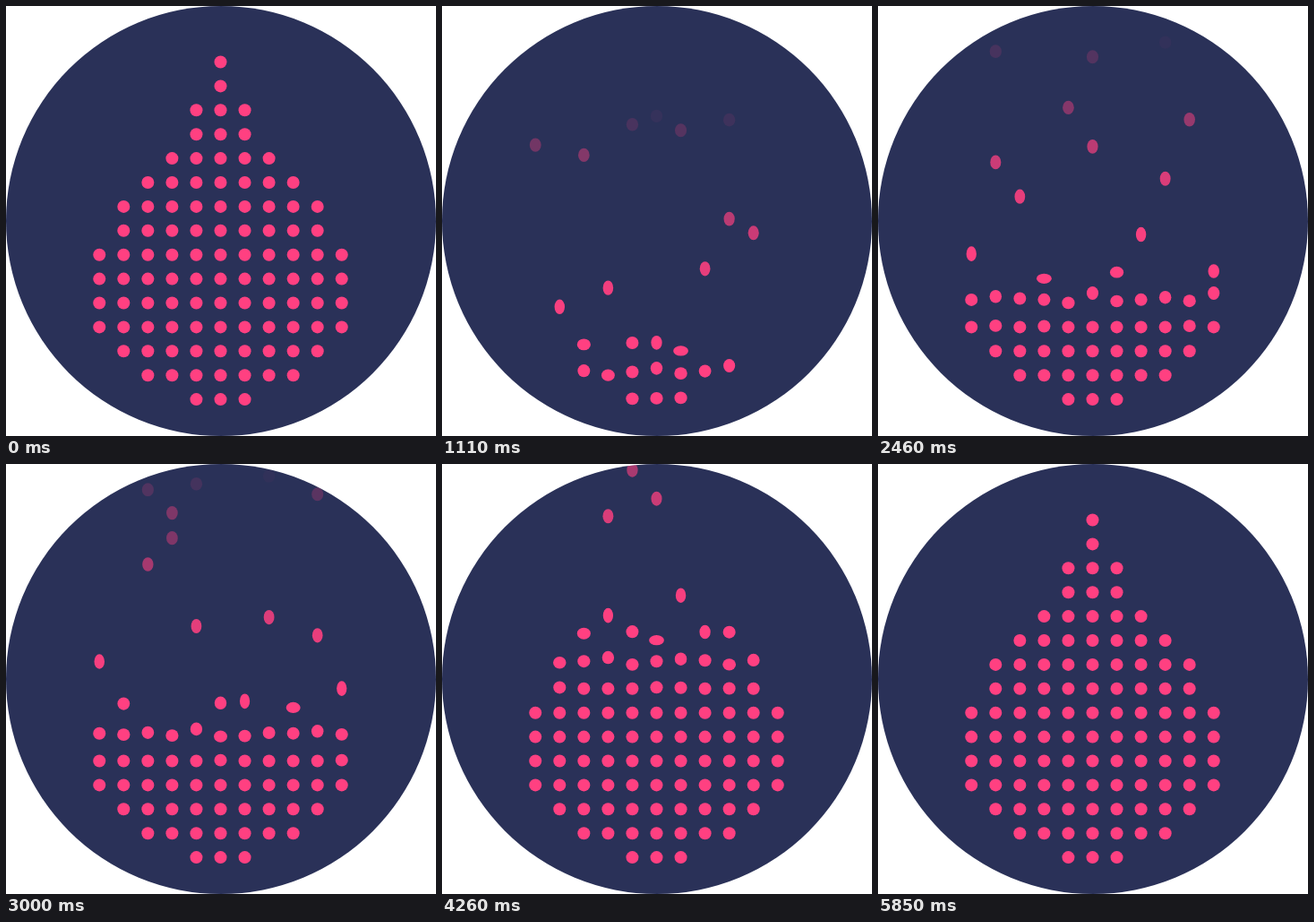
Write an HTML page with a canvas that moves like this. It is 480 px wide and 480 px high and loops after 6270 ms.

```html
<!DOCTYPE html>
<html lang="en">
<head>
<meta charset="utf-8">
<title>Falling dots</title>
<style>
  html, body { margin: 0; width: 100%; height: 100%; overflow: hidden; background: #fff; }
  canvas { display: block; width: 480px; height: 480px; }
</style>
</head>
<body>
<canvas id="stage" width="480" height="480"></canvas>
<script>
const ctx = document.getElementById('stage').getContext('2d');
const LOOP = 6270, STEP = 30, REST = 5850;
const FALL = 550, DROP = 240, RADIUS = 7;
const BLUE = '#2a3158', PINK = '#ff4081';

// Time in ms at which each dot starts to fall; rows from top to bottom, centred.
const rows = [
  [4550],
  [4460],
  [4340, 4280, 4370],
  [4110, 4180, 4145],
  [3858, 3949, 3890, 3995, 4025],
  [3635, 3743, 3600, 3700, 3771, 3721, 3610],
  [3355, 3200, 3460, 3138, 3324, 3440, 3229, 3383, 3262],
  [3030, 2850, 2765, 2880, 3053, 3010, 2940, 2978, 2830],
  [2520, 2332, 2694, 2762, 2575, 2305, 2465, 2590, 2399, 2560, 2482],
  [1943, 2088, 2028, 1900, 2212, 2119, 1840, 1970, 2058, 2180, 1920],
  [1613, 1652, 1465, 1525, 1338, 1740, 1556, 1399, 1641, 1372, 1740],
  [895, 1250, 864, 1201, 978, 1035, 950, 1120, 1005, 1223, 1150],
  [620, 490, 648, 460, 571, 550, 678, 769, 741],
  [115, 234, 175, 310, 205, 145, 370],
  [0, 5, 12]
];

const dots = rows.flatMap((starts, r) => starts.map((start, i) => ({
  start,
  x: 239.5 + 27.05 * (i - (starts.length - 1) / 2),
  y: 62.5 + 26.9 * r
})));

// Bounces after landing: from, to, height
const bounces = [[FALL, 876, 11], [876, 1120, 5], [1120, 1290, 1.5]];

// Stretch over time: positive is tall, negative is flat
const stretch = [[0, 0], [535, .2], [556, -.2], [590, -.17], [650, 0], [730, .07],
  [830, .03], [876, -.06], [960, .02], [1120, -.02], [1290, 0]];

function stretchAt(ms) {
  const i = stretch.findIndex(([t]) => t > ms);
  if (i < 0) return 0;
  const [t0, a] = stretch[i - 1], [t1, b] = stretch[i];
  return a + (b - a) * (ms - t0) / (t1 - t0);
}

function offsetAt(ms) {
  if (ms < FALL) return DROP * ((ms / FALL) ** 2 - 1);
  const hop = bounces.find(([from, to]) => ms >= from && ms < to);
  if (!hop) return 0;
  const [from, to, height] = hop;
  const u = (ms - from) / (to - from);
  const sink = from === FALL ? 1.5 * Math.max(0, 1 - (ms - from) / 30) : 0;
  return sink - 4 * height * u * (1 - u);
}

function alphaAt(ms) {
  const t = Math.min(ms / FALL, 1);
  return t * t * (3 - 2 * t);
}

function drawDot({ x, y }, ms) {
  const k = stretchAt(ms);
  ctx.globalAlpha = alphaAt(ms);
  ctx.beginPath();
  ctx.ellipse(x, y + offsetAt(ms), RADIUS * (1 - k), RADIUS * (1 + k), 0, 0, 2 * Math.PI);
  ctx.fill();
}

function draw(now) {
  const time = Math.floor((now % LOOP) / STEP) * STEP;
  const resting = time < STEP || time >= REST;

  ctx.globalAlpha = 1;
  ctx.clearRect(0, 0, 480, 480);
  ctx.save();
  ctx.beginPath();
  ctx.arc(240, 240, 240, 0, 2 * Math.PI);
  ctx.fillStyle = BLUE;
  ctx.fill();
  ctx.clip();

  ctx.fillStyle = PINK;
  for (const dot of dots) {
    const ms = resting ? LOOP : time - dot.start;
    if (ms > 0) drawDot(dot, ms);
  }
  ctx.restore();
}

const begin = performance.now();
function tick() {
  draw(performance.now() - begin);
  requestAnimationFrame(tick);
}
tick();
</script>
</body>
</html>
```
